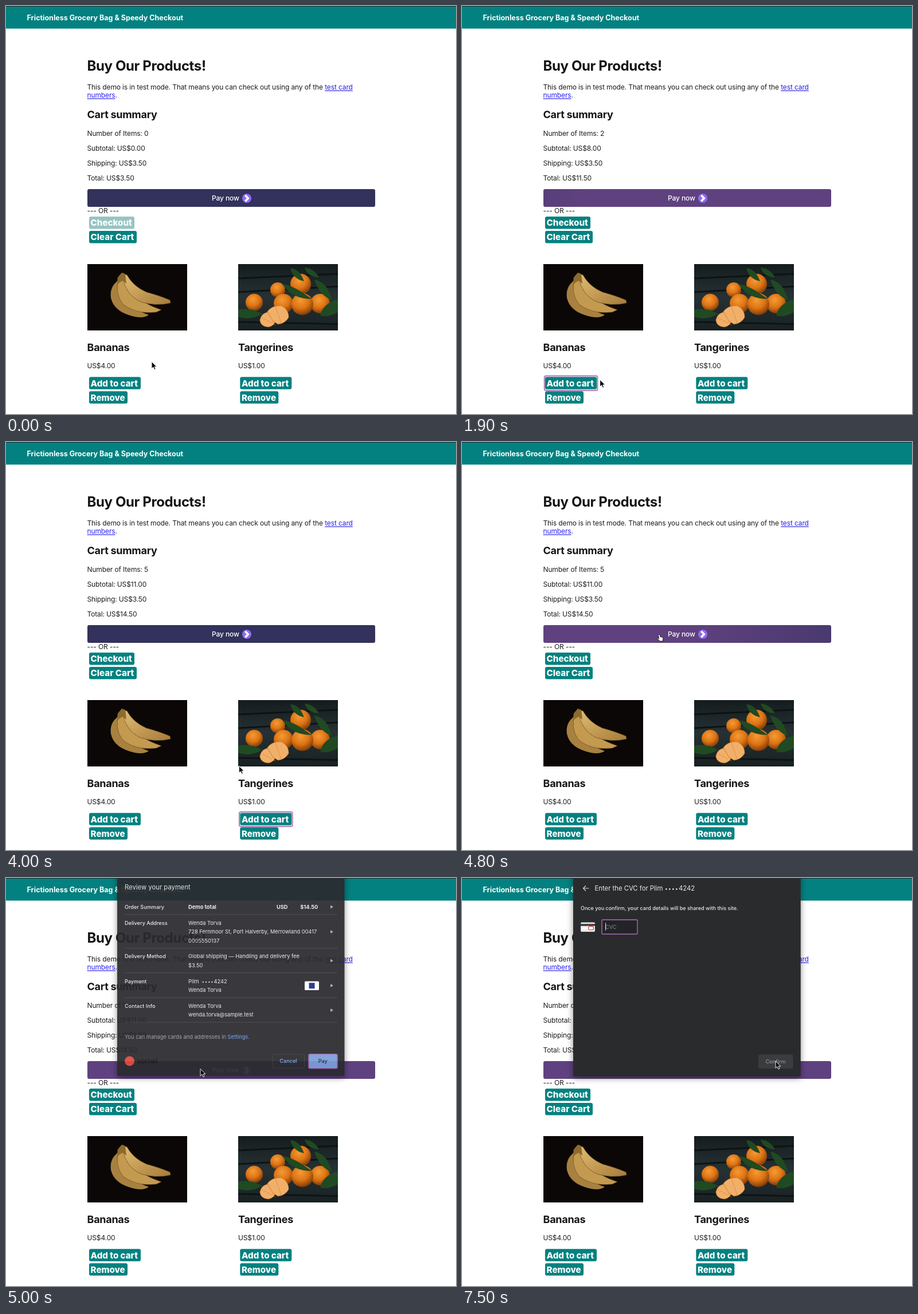
An HTML page for the animation above (8 s loop, 785 by 713 pixels).

```html
<!DOCTYPE html>
<html lang="en">
<head>
<meta charset="utf-8">
<title>Fruit shop checkout</title>
<style>
html, body { margin: 0; width: 100%; height: 100%; overflow: hidden; background: #fff; }
svg { display: block; width: 785px; height: 713px; font-family: Inter, "Liberation Sans", sans-serif; }
text { white-space: pre; }
.body { font-size: 12px; letter-spacing: -.011em; fill: #1c1c1c; }
.h1 { font-size: 24px; font-weight: 700; letter-spacing: -.016em; fill: #151515; }
.h2 { font-size: 18px; font-weight: 700; letter-spacing: -.015em; fill: #151515; }
.btn { font-size: 15.1px; font-weight: 800; fill: #fff; }
.link { fill: #2a20e8; text-decoration: underline; }
.title { font-size: 11.3px; fill: #e8eaed; }
.val { font-size: 9.25px; fill: #e8eaed; }
.lab { font-size: 9.15px; font-weight: 500; fill: #e8eaed; }
.bold { font-weight: 700; }
.mid { text-anchor: middle; }
</style>
</head>
<body>
<svg viewBox="0 0 785 713">
  <defs>
    <linearGradient id="sweep" gradientUnits="userSpaceOnUse" y1="285" y2="385">
      <stop offset="0" stop-color="#32325d"/>
      <stop offset=".333" stop-color="#5f417f"/>
      <stop offset=".667" stop-color="#5f417f"/>
      <stop offset="1" stop-color="#32325d"/>
    </linearGradient>
    <linearGradient id="peel" x2="1" y2="1">
      <stop offset="0" stop-color="#e3bd72"/>
      <stop offset="1" stop-color="#a67c3a"/>
    </linearGradient>
    <radialGradient id="orange" cx=".42" cy=".32" r=".7">
      <stop offset="0" stop-color="#f59b35"/>
      <stop offset=".55" stop-color="#dd7414"/>
      <stop offset="1" stop-color="#7c3a0a"/>
    </radialGradient>
    <linearGradient id="wood" x2="0" y2="1">
      <stop offset="0" stop-color="#151c1e"/>
      <stop offset=".5" stop-color="#263134"/>
      <stop offset="1" stop-color="#182022"/>
    </linearGradient>
    <filter id="shade" x="-10%" y="-10%" width="120%" height="120%">
      <feDropShadow dx="0" dy="3" stdDeviation="6" flood-opacity=".45"/>
    </filter>
    <clipPath id="photo"><rect x="405" y="451" width="174" height="116"/></clipPath>
    <clipPath id="panel"><rect x="194" y="0" width="396.5" height="346.5"/></clipPath>
  </defs>

  <rect width="785" height="713" fill="#fff"/>
  <rect width="785" height="39.5" fill="#038180"/>
  <rect width="785" height="1" fill="#1d2a2b"/>
  <text x="36.5" y="25.2" font-size="12.5" font-weight="700" fill="#fff">Frictionless Grocery Bag &amp; Speedy Checkout</text>

  <text class="h1" x="141.5" y="113.3">Buy Our Products!</text>
  <text class="body" x="141.5" y="146.4">This demo is in test mode. That means you can check out using any of the <tspan class="link">test card</tspan></text>
  <text class="body" x="141.5" y="160.4"><tspan class="link">numbers</tspan>.</text>
  <text class="h2" x="141.5" y="195.5">Cart summary</text>
  <text class="body" x="141.5" y="226.7" id="items"></text>
  <text class="body" x="141.5" y="252.8" id="subtotal"></text>
  <text class="body" x="141.5" y="279">Shipping: US$3.50</text>
  <text class="body" x="141.5" y="305.3" id="total"></text>

  <rect x="142" y="320" width="502" height="31" rx="3" fill="url(#sweep)"/>
  <text x="359" y="340.2" font-size="12" font-weight="500" letter-spacing="-.1" fill="#fff">Pay now</text>
  <circle cx="420" cy="336" r="8" fill="#8f6bf2"/>
  <path d="M417.3 330.8L422.3 336L417.3 341.2" fill="none" stroke="#fff" stroke-width="3.4"/>
  <text class="body" x="141.5" y="362.4">--- OR ---</text>
  <g id="buttons"></g>
  <rect id="ring" y="646.3" width="92.6" height="25.6" rx="3" fill="none" stroke="#b485ba" stroke-width="2.2"/>

  <rect x="142" y="451" width="174" height="116" fill="#0b0706"/>
  <path d="M200 477Q180 488 183 510Q188 535 225 543Q240 546 249 540Q215 528 205 505Z" fill="#a88140"/>
  <path d="M198 472Q188 500 203 520Q225 539 262 535L271 531Q232 518 215 495L208 472Z" fill="#c49a50" stroke="#6b4c1e" stroke-width=".7"/>
  <path d="M202 468L211 470Q222 490 245 500Q270 507 286 514L287 519Q262 525 235 517Q208 505 202 468Z" fill="url(#peel)" stroke="#6b4c1e" stroke-width=".7"/>
  <path d="M193 487L195 474L202 466L208 468L210 485L203 480Z" fill="#8d6b2d"/>

  <g clip-path="url(#photo)">
    <rect x="405" y="451" width="174" height="116" fill="url(#wood)"/>
    <path d="M405 476L579 468M405 500L579 490M405 552L579 556" stroke="#0d1314" stroke-width="3"/>
    <g id="fruit" fill="url(#orange)"></g>
    <g fill="#f1b06a" stroke="#d98a3c" stroke-width=".8">
      <path d="M443 549Q446 535 460 535L470 548Q470 558 458 561Q444 560 443 549Z"/>
      <path d="M456 534Q464 523 480 524Q493 530 493 544Q487 555 474 556Q462 549 456 534Z"/>
      <path d="M458 536L469 558M470 526L480 554M447 545L464 554" fill="none"/>
    </g>
    <g fill="#1f4a22">
      <path d="M496 458Q513 460 520 481Q500 477 496 458Z"/>
      <path d="M521 457Q538 459 546 474Q526 474 521 457Z"/>
      <path d="M482 486Q502 488 533 512Q499 512 482 486Z"/>
      <path d="M538 478Q562 483 568 514Q545 504 538 478Z"/>
      <path d="M405 531Q426 526 447 538Q425 551 405 543Z"/>
      <path d="M548 541Q552 521 579 512V535Q562 545 548 541Z"/>
    </g>
  </g>

  <text class="h2" x="141.5" y="602.5">Bananas</text>
  <text class="h2" x="405" y="602.5">Tangerines</text>
  <text class="body" x="141.5" y="633.4">US$4.00</text>
  <text class="body" x="405" y="633.4">US$1.00</text>

  <g id="dialog">
    <rect x="194" y="-20" width="396.5" height="366.5" fill="#2a2b2d" filter="url(#shade)"/>
    <g id="review">
      <text class="title" x="207" y="21">Review your payment</text>
      <g id="rows"></g>
      <rect x="521" y="181" width="25" height="15.5" rx="1.5" fill="#fff"/>
      <rect x="528.5" y="183.8" width="10" height="10" fill="#1d2f86"/>
      <text class="val" x="207" y="281.6" fill-opacity=".62">You can manage cards and addresses in <tspan fill="#6ba5ff" fill-opacity="1">Settings</tspan>.</text>
      <circle cx="215.5" cy="320.7" r="8.5" fill="#dd4b3c"/>
      <text x="228" y="325" font-size="12.5" fill="#111214">vornel</text>
      <rect x="465" y="308.7" width="55.5" height="24.3" rx="2.5" fill="none" stroke="#3b3d41"/>
      <text class="lab mid" x="492.5" y="324" style="fill:#8ab4f8">Cancel</text>
      <rect x="528" y="308.3" width="50" height="25" rx="2.5" fill="#7b9ed9" stroke="#9a62ad" stroke-width="1.6"/>
      <text class="lab mid" x="552.7" y="324" style="fill:#22262d">Pay</text>
    </g>
    <g clip-path="url(#panel)">
      <g id="cvc">
        <rect x="194" y="-2" width="397" height="349" fill="#2a2b2d"/>
        <path d="M221.5 18H211.8M216 13.5L211.5 18L216 22.5" fill="none" stroke="#d5d7da" stroke-width="1.2"/>
        <text class="title" x="231.5" y="22">Enter the CVC for Plim <tspan letter-spacing="1" font-size="9">••••</tspan>4242</text>
        <text class="lab" x="207" y="56.2" style="font-size:9px">Once you confirm, your card details will be shared with this site.</text>
        <rect x="207" y="77.5" width="25" height="16.5" rx="2" fill="#e6e7e9"/>
        <rect x="207" y="80.3" width="25" height="3.4" fill="#35363a"/>
        <rect x="210" y="86.3" width="10" height="3.5" fill="#fff"/>
        <rect x="220.5" y="84.7" width="9" height="5.8" rx="2.8" fill="#fff" stroke="#d8433a" stroke-width="1.2"/>
        <rect x="244" y="73" width="62" height="25" rx="2" fill="#232427" stroke="#8a5a97" stroke-width="1.8"/>
        <text class="val" x="250" y="88.5" style="fill:#85898e">CVC</text>
        <path d="M250.5 78.5V91.5" stroke="#e8eaed"/>
        <rect x="517" y="308.5" width="60.5" height="24.5" rx="2.5" fill="#3b3c3f"/>
        <text class="lab mid" x="547" y="324" style="fill:#8e9297">Confirm</text>
      </g>
    </g>
  </g>

  <g id="cursor">
    <path id="arrow" d="M0 0V12.2L2.9 9.6L4.9 14L7 13.1L5.1 8.9H8.9Z" fill="#0a0a0a" stroke="#fff" stroke-width=".9"/>
    <path id="hand" transform="translate(1 2)" d="M3 1.2Q4.2 .2 5 1.5L6 5L9.5 5.6Q11 6 10.8 8L10.4 12.5H5L1 8Q.6 6.6 2.2 7L3.8 8.2L2.4 2.4Q2.2 1.6 3 1.2Z" fill="#fff" stroke="#111" stroke-width=".9"/>
  </g>
</svg>
<script>
const LOOP = 8000;
const $ = id => document.getElementById(id);
const set = (el, attrs) => { for (const k in attrs) el.setAttribute(k, attrs[k]); };
const show = (el, on) => set(el, { visibility: on ? "visible" : "hidden" });
const clamp = v => Math.max(0, Math.min(1, v));
const span = (t, a, b) => clamp((t - a) / (b - a));
const easeOut = p => Math.sin(p * Math.PI / 2);

// label, x, y, width
const buttons = [
  ["Checkout", 145, 368, 79], ["Clear Cart", 145, 393, 83],
  ["Add to cart", 145, 648.3, 90], ["Remove", 145, 673.3, 67],
  ["Add to cart", 408.3, 648.3, 90], ["Remove", 408.3, 673.3, 67]
];
$("buttons").innerHTML = buttons.map(([label, x, y, w]) =>
  `<rect x="${x}" y="${y}" width="${w}" height="21.5" rx="3" fill="#038180"/>` +
  `<text class="btn" x="${x + 2.6}" y="${y + 16.2}">${label}</text>`).join("");
const checkout = $("buttons").firstChild;

const fruit = [[474, 496, 13], [433, 518, 15], [548, 520, 17], [514, 486, 18], [484, 520, 17], [517, 521, 19]];
$("fruit").innerHTML = fruit.map(([x, y, r]) => `<circle cx="${x}" cy="${y}" r="${r}"/>`).join("");

// label, first baseline, arrow y, rule y, lines
const rows = [
  ["Order Summary", 54.4, 51.2, 64.5, []],
  ["Delivery Address", 82.2, 94.5, 123.3, ["Wenda Torva", "728 Fernmoor St, Port Halverby, Merrowland 00417", "0005550137"]],
  ["Delivery Method", 141, 145.2, 166.3, ["Global shipping — Handling and delivery fee", "$3.50"]],
  ["Payment", 184.5, 188.5, 209.7, ["Plim  <tspan letter-spacing=\"1\" font-size=\"7.5\">••••</tspan>4242", "Wenda Torva"]],
  ["Contact Info", 227.5, 231.7, 252.8, ["Wenda Torva", "wenda.torva@sample.test"]]
];
$("rows").innerHTML = rows.map(([label, y, mark, rule, lines]) =>
  `<text class="lab" x="207" y="${y}">${label}</text>` +
  lines.map((s, i) => `<text class="val" x="318" y="${y + i * 15.5}">${s}</text>`).join("") +
  `<path d="M566 ${mark - 3}L571 ${mark}L566 ${mark + 3}Z" fill="#a3a6aa"/>` +
  `<path d="M207 ${rule}H578" stroke="#424347"/>`).join("") +
  [["Demo total", 318], ["USD", 472], ["$14.50", 513.3]].map(([s, x]) =>
    `<text class="val bold" x="${x}" y="54.4">${s}</text>`).join("");

// start, end, x, y
const moves = [
  [0, 0, 254, 621.5], [150, 850, 222, 653], [1850, 2750, 432, 654.5],
  [3850, 4700, 339, 333.5], [6200, 6900, 547, 320]
];
// time, item price
const adds = [[1100, 4], [1500, 4], [3100, 1], [3300, 1], [3600, 1]];

function pointer(t) {
  let [, , x, y] = moves[0];
  for (const [a, b, nx, ny] of moves.slice(1)) {
    const p = easeOut(span(t, a, b));
    x += (nx - x) * p;
    y += (ny - y) * p;
  }
  return [x, y];
}

function drawCart(t) {
  const bought = adds.filter(([at]) => t >= at);
  const sum = bought.reduce((s, [, price]) => s + price, 0);
  $("items").textContent = "Number of Items: " + bought.length;
  $("subtotal").textContent = "Subtotal: US$" + sum.toFixed(2);
  $("total").textContent = "Total: US$" + (sum + 3.5).toFixed(2);
  set(checkout, { fill: bought.length ? "#038180" : "#96c4c3" });
  show($("ring"), t >= 1000 && t < 4800);
  set($("ring"), { x: t < 3000 ? 143.8 : 407 });
}

function drawSweep(t) {
  let front = 0;
  if (t >= 950 && t < 2900) front = 300 + (t - 1000) * 1.02;
  if (t >= 4200) front = 142 + (Math.min(t, 5000) - 4200) * 1.253;
  set($("sweep"), { x1: front - 1500, x2: front });
}

function drawDialog(t) {
  const fade = span(t, 4820, 5060);
  const p = easeOut(fade);
  set($("dialog"), { opacity: p, transform: `translate(0 ${-8 * (1 - p)})` });
  show($("dialog"), fade > 0);
  const slide = easeOut(span(t, 7120, 7500));
  set($("cvc"), { transform: `translate(${397 * (1 - slide)} 0)` });
}

function draw(t) {
  drawCart(t);
  drawSweep(t);
  drawDialog(t);
  const [x, y] = pointer(t);
  const over = t < 4900 && y > 320 && y < 351;
  set($("cursor"), { transform: `translate(${x} ${y})` });
  show($("arrow"), !over);
  show($("hand"), over);
}

const start = performance.now();
function tick() {
  draw((performance.now() - start) % LOOP);
  requestAnimationFrame(tick);
}
tick();
</script>
</body>
</html>
```
